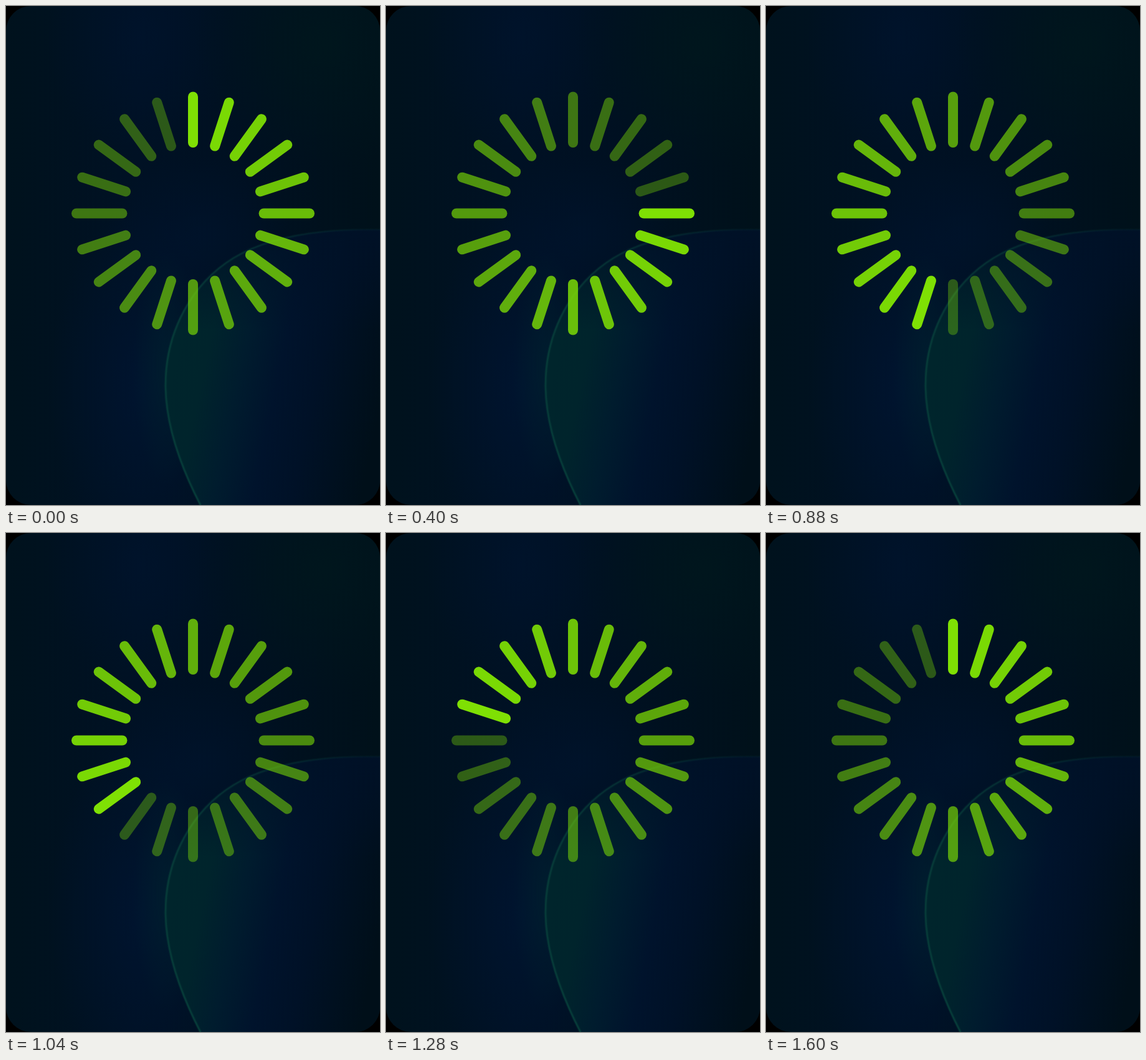
An HTML page for the animation above (1640 ms loop, 600 by 800 pixels).

```html
<!DOCTYPE html>
<html lang="en">
<head>
<meta charset="utf-8">
<title>Loading spinner</title>
<style>
html, body { margin: 0; width: 100%; height: 100%; overflow: hidden; background: #000; }
svg { display: block; width: 100vw; height: 100vh; }
</style>
</head>
<body>
<svg viewBox="0 0 600 800">
  <defs>
    <clipPath id="card"><rect width="600" height="800" rx="40"/></clipPath>
    <linearGradient id="base" x1="0" x2="1" y1="0" y2="0">
      <stop offset="0" stop-color="#00121d"/>
      <stop offset=".35" stop-color="#001124"/>
      <stop offset=".65" stop-color="#001021"/>
      <stop offset="1" stop-color="#00111a"/>
    </linearGradient>
    <radialGradient id="blue">
      <stop offset="0" stop-color="#00142f"/>
      <stop offset="1" stop-color="#00142f" stop-opacity="0"/>
    </radialGradient>
    <radialGradient id="teal">
      <stop offset="0" stop-color="#00161d"/>
      <stop offset="1" stop-color="#00161d" stop-opacity="0"/>
    </radialGradient>
    <radialGradient id="glow">
      <stop offset="0" stop-color="#00212f"/>
      <stop offset="1" stop-color="#00212f" stop-opacity="0"/>
    </radialGradient>
    <linearGradient id="inside" gradientUnits="userSpaceOnUse" x1="262" y1="600" x2="595" y2="670">
      <stop offset="0" stop-color="#00252c"/>
      <stop offset=".15" stop-color="#00242c"/>
      <stop offset=".32" stop-color="#001c2e"/>
      <stop offset=".5" stop-color="#00132c"/>
      <stop offset=".68" stop-color="#001127"/>
      <stop offset="1" stop-color="#000f19"/>
    </linearGradient>
    <linearGradient id="top" gradientUnits="userSpaceOnUse" x1="0" y1="358" x2="0" y2="520">
      <stop offset="0" stop-color="#001127" stop-opacity=".9"/>
      <stop offset="1" stop-color="#001127" stop-opacity="0"/>
    </linearGradient>
    <linearGradient id="edge" gradientUnits="userSpaceOnUse" x1="570" y1="350" x2="270" y2="560">
      <stop offset="0" stop-color="#063335" stop-opacity=".15"/>
      <stop offset=".5" stop-color="#063335" stop-opacity=".7"/>
      <stop offset="1" stop-color="#063a38"/>
    </linearGradient>
    <path id="curve" d="M600 358.500C520 357 430 365 365 404C300 444 255 520 256 611C257 675 282 742 312 800"/>
  </defs>
  <g clip-path="url(#card)">
    <rect width="600" height="800" fill="url(#base)"/>
    <ellipse cx="215" cy="50" rx="150" ry="190" fill="url(#blue)" opacity=".6"/>
    <ellipse cx="510" cy="60" rx="210" ry="200" fill="url(#teal)"/>
    <ellipse cx="310" cy="370" rx="150" ry="130" fill="url(#blue)" opacity=".6"/>
    <ellipse cx="220" cy="610" rx="150" ry="290" fill="url(#blue)"/>
    <ellipse cx="258" cy="580" rx="55" ry="190" fill="url(#glow)" opacity=".7"/>
    <path d="M600 358.500C520 357 430 365 365 404C300 444 255 520 256 611C257 675 282 742 312 800H600Z" fill="url(#inside)"/>
    <path d="M600 358.500C520 357 430 365 365 404C300 444 255 520 256 611C257 675 282 742 312 800H600Z" fill="url(#top)"/>
    <use href="#curve" fill="none" stroke="url(#edge)" stroke-width="5" opacity=".3"/>
    <use href="#curve" fill="none" stroke="url(#edge)" stroke-width="2.500"/>
    <g id="bars" transform="translate(300 332.500)" stroke="#7fe004" stroke-width="16" stroke-linecap="round"/>
  </g>
</svg>
<script>
const COUNT = 20, STEP = 80, LOOP = 1640, FADE = 0.65;
const group = document.getElementById('bars');

const bars = Array.from({ length: COUNT }, (_, i) => {
  const bar = document.createElementNS('http://www.w3.org/2000/svg', 'line');
  bar.setAttribute('y1', -187);
  bar.setAttribute('y2', -113.5);
  bar.setAttribute('transform', `rotate(${i * 360 / COUNT})`);
  group.appendChild(bar);
  return bar;
});

// The brightest bar steps clockwise; those ahead of it grow dimmer.
function draw(time) {
  const head = Math.floor(time / STEP) % COUNT;
  bars.forEach((bar, i) => {
    const rank = (i - head + COUNT) % COUNT;
    bar.setAttribute('stroke-opacity', 1 - FADE * rank / (COUNT - 1));
  });
}

const start = performance.now();
function tick() {
  draw((performance.now() - start) % LOOP);
  requestAnimationFrame(tick);
}
draw(0);
requestAnimationFrame(tick);
</script>
</body>
</html>
```
